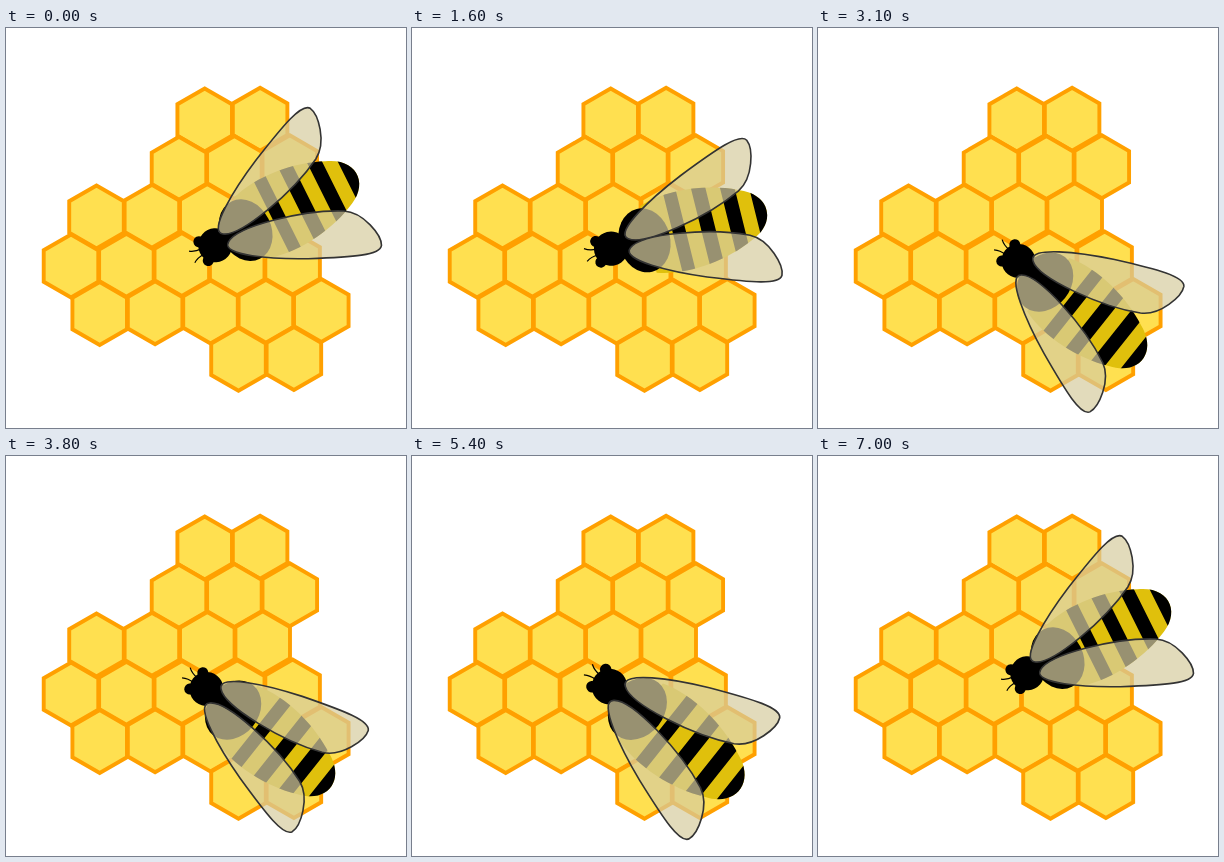
Recreate the animation shown at these times as an HTML page. Size 400x400 px, loop 7.1 s.

```html
<!DOCTYPE html>
<html lang="en">
<head>
<meta charset="utf-8">
<title>Bee on honeycomb</title>
<style>
  html, body { margin: 0; width: 100%; height: 100%; overflow: hidden; background: #fff; }
  svg { display: block; width: 100%; height: 100%; }
</style>
</head>
<body>
<svg viewBox="0 0 400 400">
  <defs>
    <path id="abdomen" d="M-40-34C-10-44 30-39 58-26C88-15 88 15 58 26C30 39-10 44-40 34Z"/>
    <clipPath id="inside"><use href="#abdomen"/></clipPath>
    <path id="wing" d="M0 0C8-16 75-33 115-32C135-31 153-8 153 2C152 12 125 14 80 16C45 17-8 14 0 0Z"
      fill="rgba(214,204,160,.71)" stroke="#333" stroke-width="1.6"/>
  </defs>
  <g id="comb" fill="#ffe050" stroke="#ffa000" stroke-width="3.9"></g>
  <g id="body">
    <use href="#abdomen" fill="#e0c00c"/>
    <path clip-path="url(#inside)" d="M-15-50h13v100h-13zM13-50h14v100h-14zM41-50h14v100h-14zM69-50h20v100h-20z"/>
    <ellipse cx="-44" rx="25.5" ry="32"/>
    <circle cx="-78" r="17"/>
    <circle cx="-91" cy="-10.5" r="5.5"/>
    <circle cx="-91" cy="10.5" r="5.5"/>
    <path d="M-92-3Q-99-3-104-6.5M-92 3Q-99 3-104 6.5" fill="none" stroke="#000" stroke-width="1.2"/>
  </g>
  <g id="upper"><use href="#wing" transform="scale(1 -1)"/></g>
  <g id="lower"><use href="#wing"/></g>
</svg>
<script>
const LOOP = 7100, STEP = 100;
const el = id => document.getElementById(id);
const mix = (a, b, p) => a + (b - a) * p;

// Each row: first centre x, centre y, number of cells.
const rows = [[198.7, 92, 2], [173, 140.3, 3], [90.5, 189, 4], [65, 238, 5], [93.7, 285.5, 5], [232.5, 331.3, 2]];
const RADIUS = 31.5, SPACING = 55.4, TILT = -0.75;
for (const [x, y, count] of rows) {
  for (let i = 0; i < count; i++) {
    const points = Array.from({ length: 6 }, (_, k) => {
      const a = (k + 0.5) * Math.PI / 3;
      return [x + i * SPACING + RADIUS * Math.cos(a), y + i * TILT + RADIUS * Math.sin(a)];
    });
    const cell = document.createElementNS("http://www.w3.org/2000/svg", "polygon");
    cell.setAttribute("points", points.join(" "));
    el("comb").append(cell);
  }
}

// Keys are [time, value], joined by straight segments.
const turnKeys = [[1480, 0], [2100, 1], [5580, 1], [6200, 0]];
const liftKeys = [[1500, 0], [2100, 1], [2200, 1], [2600, 0], [5100, 0], [5500, 1], [5600, 1], [6200, 0]];
const CLOSED = 14.5, HALF = 27.5, OPEN = 34;
const spreadKeys = [
  [0, HALF], [100, OPEN], [400, CLOSED], [1500, CLOSED],
  [1700, OPEN], [1950, CLOSED], [2200, OPEN], [2450, CLOSED], [2700, OPEN], [2950, CLOSED], [3200, OPEN],
  [3400, 28], [3600, 23], [3900, 18.5], [4300, 15.5], [4900, CLOSED],
  [5100, OPEN], [5300, CLOSED], [5500, OPEN], [5750, CLOSED], [6000, OPEN], [6200, CLOSED],
  [6800, CLOSED], [7000, HALF]
];

function track(keys, t) {
  const next = keys.findIndex(([time]) => time > t);
  if (next === 0) return keys[0][1];
  if (next < 0) return keys[keys.length - 1][1];
  const [t0, a] = keys[next - 1], [t1, b] = keys[next];
  return mix(a, b, (t - t0) / (t1 - t0));
}

function place(id, x, y, angle, scale) {
  el(id).setAttribute("transform", `translate(${x} ${y}) rotate(${angle}) scale(${scale})`);
}

function draw(now) {
  const t = Math.floor(now % LOOP / STEP) * STEP;
  const turn = track(turnKeys, t), lift = track(liftKeys, t), spread = track(spreadKeys, t);
  const wingAxis = mix(-27, 36.5, turn), wingScale = 1 + 0.04 * lift;
  const dx = -2.3 * lift, dy = -3.5 * lift;

  place("body", mix(279, 261.5, turn), mix(182.5, 281.5, turn), mix(-26.5, 38.5, turn), 1 + 0.065 * lift);
  place("upper", mix(217, 215, turn) + dx, mix(206, 233, turn) + dy, wingAxis - spread, wingScale);
  place("lower", mix(222.5, 203.5, turn) + dx, mix(214, 247, turn) + dy, wingAxis + spread, wingScale);
  requestAnimationFrame(() => draw(performance.now()));
}
draw(performance.now());
</script>
</body>
</html>
```
